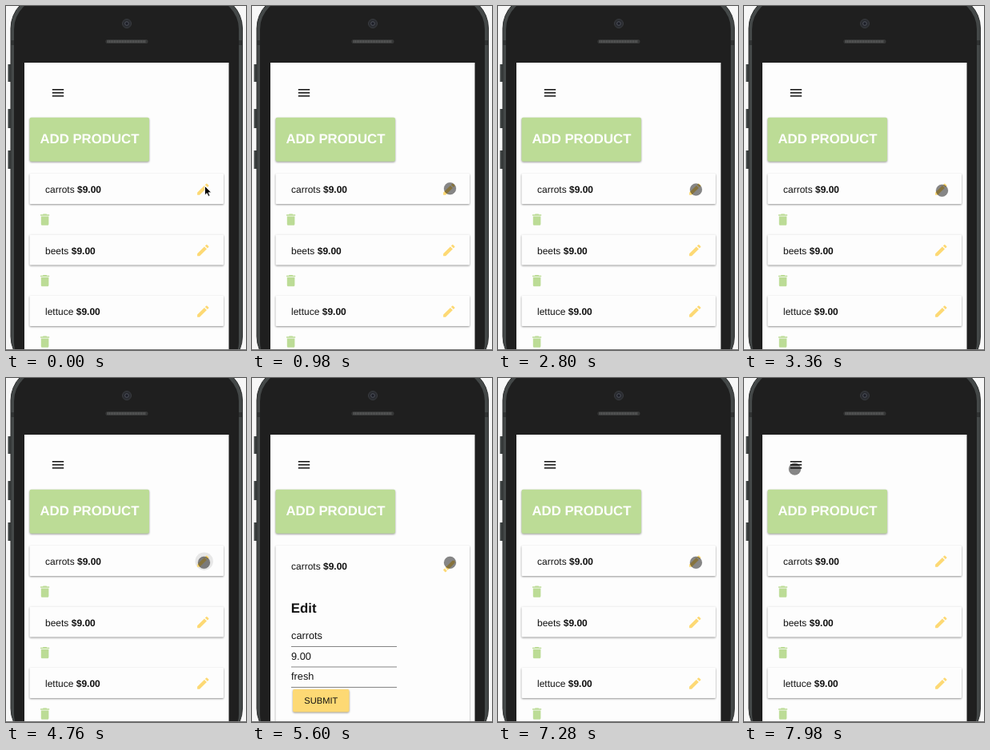
Write an HTML page that moves like this. It is 300 by 431 pixels and loops after 8 s.

```html
<!DOCTYPE html>
<html lang="en">
<head>
<meta charset="utf-8">
<title>Product list</title>
<style>
html, body { margin: 0; width: 100%; height: 100%; overflow: hidden; background: #f7f7f7; }
svg { display: block; width: 300px; height: 431px; font: 12px "Liberation Sans", Arial, sans-serif; fill: #111; text-rendering: geometricPrecision; }
.b { font-weight: bold; }
.card { fill: #fdfdfd; filter: drop-shadow(0 1px 1px rgba(0,0,0,.42)); }
.raised { filter: drop-shadow(0 1px 1px rgba(0,0,0,.4)); }
.green { fill: #bcdc96; }
.yellow { fill: #fdd974; }
.field { font-size: 12.75px; }
</style>
</head>
<body>
<svg viewBox="0 0 300 431">
  <defs>
    <path id="pencil" class="yellow" transform="scale(.8)" d="M3 17.25V21h3.75L17.81 9.94l-3.75-3.75zM20.71 7.04c.39-.39.39-1.02 0-1.41l-2.34-2.34c-.39-.39-1.02-.39-1.41 0l-1.83 1.83 3.75 3.75z"/>
    <path id="bin" class="green" transform="scale(.8)" d="M6 19c0 1.1.9 2 2 2h8c1.1 0 2-.9 2-2V7H6zM19 4h-3.5l-1-1h-5l-1 1H5v2h14z"/>
    <clipPath id="screen"><path d="M23 71H278.5V431H23z"/></clipPath>
    <clipPath id="panelClip"><rect id="panelBox" x="29.5" y="210" width="242.5"/></clipPath>
  </defs>

  <!-- phone -->
  <path fill="#3d4141" d="M2.5 73h4v22h-4zM2.5 129h4v24h-4zM2.5 181h4v23h-4z"/>
  <rect x="6" y="-14" width="289.5" height="470" rx="42" fill="#444848" stroke="#2b2d2d"/>
  <path fill="#303333" d="M6 43h4v6H6zM291 43h4v6h-4z"/>
  <rect x="10" y="-10" width="281" height="470" rx="39" fill="#1f1f1f"/>
  <circle cx="151" cy="22" r="5.5" fill="#292b30" stroke="#3a3c40"/>
  <circle cx="151" cy="22" r="2.3" fill="#1b1d26" stroke="#50535c"/>
  <rect x="124.5" y="42" width="53" height="5" rx="2.5" fill="#383939"/>
  <path d="M127 44.5h48" stroke="#626363" stroke-width="3" stroke-dasharray="1 1"/>
  <path fill="#fdfdfd" d="M23 71H278.5V431H23z"/>

  <g clip-path="url(#screen)">
    <path d="M57.8 104h14.4v1.6H57.8zM57.8 108h14.4v1.6H57.8zM57.8 112h14.4v1.6H57.8z"/>
    <rect class="green raised" x="29.5" y="139.7" width="149.5" height="55" rx="2"/>
    <text class="b" x="104.4" y="172" text-anchor="middle" font-size="16.8" fill="#fff">ADD PRODUCT</text>

    <g id="rest"></g>
    <rect id="panel" class="card" x="29.5" y="210" width="242.5" rx="1"/>
    <g clip-path="url(#panelClip)">
      <g id="edit">
        <text class="b" x="48.8" y="294" font-size="16.8">Edit</text>
        <g class="field">
          <text x="49" y="327">carrots</text>
          <text x="49" y="352.7">9.00</text>
          <text x="49" y="378">fresh</text>
        </g>
        <path d="M49 336.5H181M49 362H181M49 387.5H181" stroke="#858585"/>
        <rect class="yellow raised" x="51" y="390" width="70.5" height="28.5" rx="2"/>
        <text x="86.3" y="407.8" text-anchor="middle" font-size="11.1">SUBMIT</text>
      </g>
    </g>
    <g id="head">
      <circle id="ripple" cx="247.7" cy="229.7"/>
      <text x="49" y="234">carrots <tspan class="b">$9.00</tspan></text>
      <g id="icon"><use href="#pencil" x="236.7" y="220"/></g>
    </g>
  </g>
  <path fill="#777" d="M0 430H300v1H0z"/>

  <path id="arrow" d="M248.5 225.5v11.5l2.7-2.5 1.8 4 1.9-.9-1.8-3.8h3.6z" fill="#000" stroke="#fff" stroke-width=".8"/>
  <circle id="touch" r="7.5" fill="#000" fill-opacity=".47" stroke="#000" stroke-opacity=".2" stroke-width=".7"/>
</svg>
<script>
const $ = id => document.getElementById(id);
const LOOP = 8000, STEP = 140, GROW = 204;

const bin = y => `<use href="#bin" x="39" y="${y}"/>`;
const row = (name, y) => `<rect class="card" x="29.5" y="${y}" width="242.5" height="38" rx="1"/>
  <text x="49" y="${y + 24}">${name} <tspan class="b">$9.00</tspan></text>
  <use href="#pencil" x="236.7" y="${y + 10}"/>${bin(y + 48)}`;
$("rest").innerHTML = bin(258) + row("beets", 286.5) + row("lettuce", 363);

const ramp = (t, a, b) => Math.min(1, Math.max(0, (t - a) / (b - a)));
const ease = (t, a, b) => { const p = ramp(t, a, b); return p * p * (3 - 2 * p); };
const set = (id, attrs) => { for (const k in attrs) $(id).setAttribute(k, attrs[k]); };
const shift = (id, y) => set(id, { transform: `translate(0 ${y})` });

function setRipple(t) {
  const start = t < 6000 ? 4620 : 6440;
  const p = ramp(t, start, start + 560);
  set("ripple", {
    r: 8 + 11 * ease(p, 0, .7),
    "fill-opacity": t < start ? 0 : .12 * (1 - p)
  });
}

function draw(t) {
  const open = ease(t, 4760, 5180) - ease(t, 6860, 7280);
  const height = 38 + GROW * open;
  set("panel", { height });
  set("panelBox", { height });
  shift("rest", GROW * open);
  shift("head", 6.4 * open);
  shift("edit", 12.8 * (open - 1));
  set("icon", { transform: `rotate(${180 * open} 246.3 229.6)` });
  setRipple(t);

  const away = ease(t, 7280, 7840);
  const y = 228.7 + 2.5 * ease(t, 2520, 3080);
  set("touch", { cx: 247.5 - 184 * away, cy: y + (114 - y) * away });
  const mouse = t < 560;
  $("arrow").style.display = mouse ? "" : "none";
  $("touch").style.display = mouse ? "none" : "";
}

const begin = performance.now();
function tick() {
  const t = (performance.now() - begin) % LOOP;
  draw(Math.floor(t / STEP) * STEP);
  requestAnimationFrame(tick);
}
tick();
</script>
</body>
</html>
```
